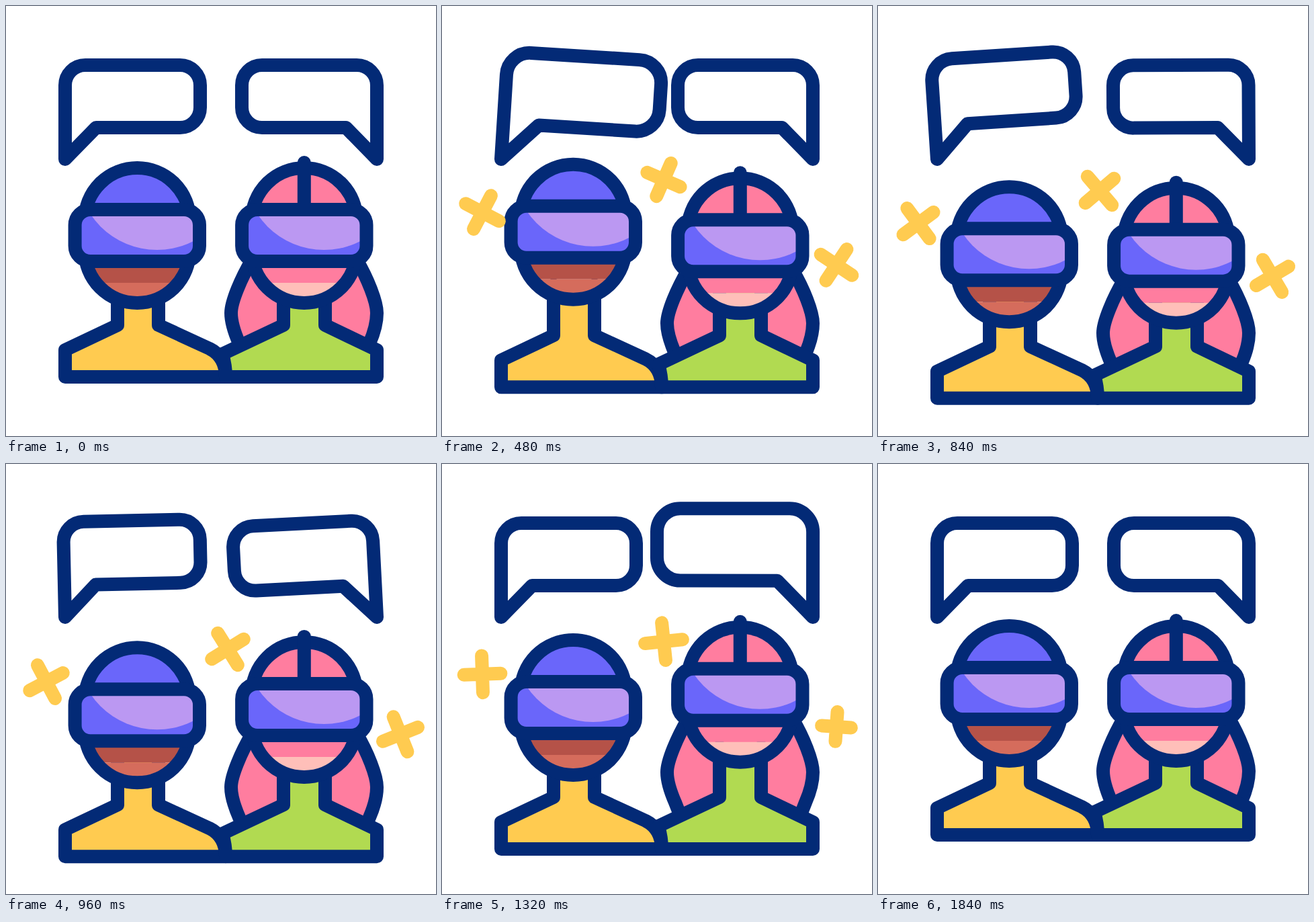
An HTML page for the animation above (1.96 s loop, 640 px wide and 640 px high).

```html
<!DOCTYPE html>
<html lang="en">
<head>
<meta charset="utf-8">
<title>Virtual meeting</title>
<style>
  html, body { margin: 0; height: 100%; overflow: hidden; background: #fff; }
  svg { display: block; width: 100vw; height: 100vh; }
  .line { stroke: #032a76; stroke-width: 20; stroke-linecap: round; stroke-linejoin: round; }
  .bubble { fill: none; vector-effect: non-scaling-stroke; }
  .spark { fill: none; stroke: #ffcb50; stroke-width: 20; stroke-linecap: round; }
</style>
</head>
<body>
<svg id="stage" viewBox="0 0 640 640"></svg>
<script>
const LOOP = 1960, LAST = 1840, STEP = 40;

// Heads are drawn around x = 0
const head = (id, x, top, face, chin, extra = '') => `
  <g id="${id}"><g transform="translate(${x})">
    <g clip-path="url(#skull)">
      <path fill="${top}" d="M-90 230H90V340H-90z"/>
      <path fill="${face}" d="M-90 340H90V412H-90z"/>
      <path fill="${chin}" d="M-90 412H90V452H-90z"/>
    </g>
    <rect class="line" fill="none" x="-78" y="241" width="156" height="201" rx="78"/>
    ${extra}
    <rect fill="#6a66fa" x="-92.7" y="303" width="185.4" height="77" rx="23"/>
    <circle fill="#bb98f2" cx="29.5" cy="244" r="119" clip-path="url(#glass)"/>
    <rect class="line" fill="none" x="-92.7" y="303" width="185.4" height="77" rx="23"/>
  </g></g>`;

const bubble = 'M88 228V118A30 30 0 0 1 118 88H259A30 30 0 0 1 289 118V151A30 30 0 0 1 259 181H134Z';

const sparks = [
  { x: 60, y: 291.8, turn: -7, grow: 120, shrink: 1285 },
  { x: 330, y: 243.2, turn: -11, grow: 200, shrink: 1370 },
  { x: 587, y: 370, turn: -1, grow: 40, shrink: 1200 }
];

document.getElementById('stage').innerHTML = `
  <clipPath id="skull"><rect x="-78" y="241" width="156" height="201" rx="78"/></clipPath>
  <clipPath id="glass"><rect x="-92.7" y="303" width="185.4" height="77" rx="23"/></clipPath>
  <path id="bubbleL" class="line bubble" d="${bubble}"/>
  <g transform="matrix(-1 0 0 1 640 0)"><path id="bubbleR" class="line bubble" d="${bubble}"/></g>
  <path id="hair" class="line" fill="#ff7d9f"
    d="M366 378C350 405 335 440 335 457C335 470 340 486 347 502L358 530H530L541 502C548 486 552 470 552 457C552 440 538 405 522 378"/>
  <g id="bodies" class="line">
    <path fill="#ffcb50" d="M166 400V475L88 512V552H327Q327 522 303 510L227 475V400"/>
    <path fill="#b1da51" d="M413 400V475L322 518Q327 535 327 552H552V512L475 475V400"/>
  </g>
  ${head('headL', 195.3, '#6a66fa', '#b55248', '#d56c5c')}
  ${head('headR', 443.8, '#ff7d9f', '#ff7d9f', '#ffbfb9', '<path class="line" d="M0 233V303"/>')}
  ${sparks.map((s, i) => `<path id="spark${i}" class="spark"/>`).join('')}`;

const el = id => document.getElementById(id);
const move = (id, y) => el(id).setAttribute('transform', `translate(0 ${y})`);
const part = (t, a, b) => Math.min(1, Math.max(0, (t - a) / (b - a)));
const smooth = x => x * x * (3 - 2 * x);
const steep = x => x < .5 ? (2 * x) ** 2.3 / 2 : 1 - (2 - 2 * x) ** 2.3 / 2;

// Eased value along [time, value] keys
function track(t, keys, ease = smooth) {
  return keys.slice(1).reduce((v, [time, value], i) =>
    v + (value - keys[i][1]) * ease(part(t, keys[i][0], time)), keys[0][1]);
}

function sway(id, t) {
  const angle = track(t, [[0, 0], [330, 6.2], [685, -5.1], [1030, 0]]);
  const size = track(t, [[0, 1], [510, 1.155], [1000, 1]]);
  el(id).setAttribute('transform',
    `translate(88 228) rotate(${angle}) scale(${size}) translate(-88 -228)`);
}

const lift = t => track(t, [[0, 0], [505, 20.7], [960, 0]]);

function draw(t) {
  const body = track(t, [[40, 0], [940, 32.3], [960, 32.3], [1800, 0]], steep);
  const right = body - lift(t - 740);
  move('bodies', body);
  move('headL', body - lift(t));
  move('headR', right);
  move('hair', right);
  sway('bubbleL', t - 40);
  sway('bubbleR', t - 800);

  sparks.forEach((s, i) => {
    const r = 28 * (smooth(part(t, s.grow, s.grow + 320)) - smooth(part(t, s.shrink, s.shrink + 400)));
    const path = el('spark' + i);
    path.setAttribute('d', r > .01 ? `M${-r} 0H${r}M0 ${-r}V${r}` : '');
    path.setAttribute('transform', `translate(${s.x} ${s.y + body}) rotate(${.072 * t + s.turn})`);
  });
}

const start = performance.now();
function frame() {
  const t = (performance.now() - start) % LOOP;
  draw(Math.min(LAST, Math.floor(t / STEP) * STEP));
  requestAnimationFrame(frame);
}
frame();
</script>
</body>
</html>
```
